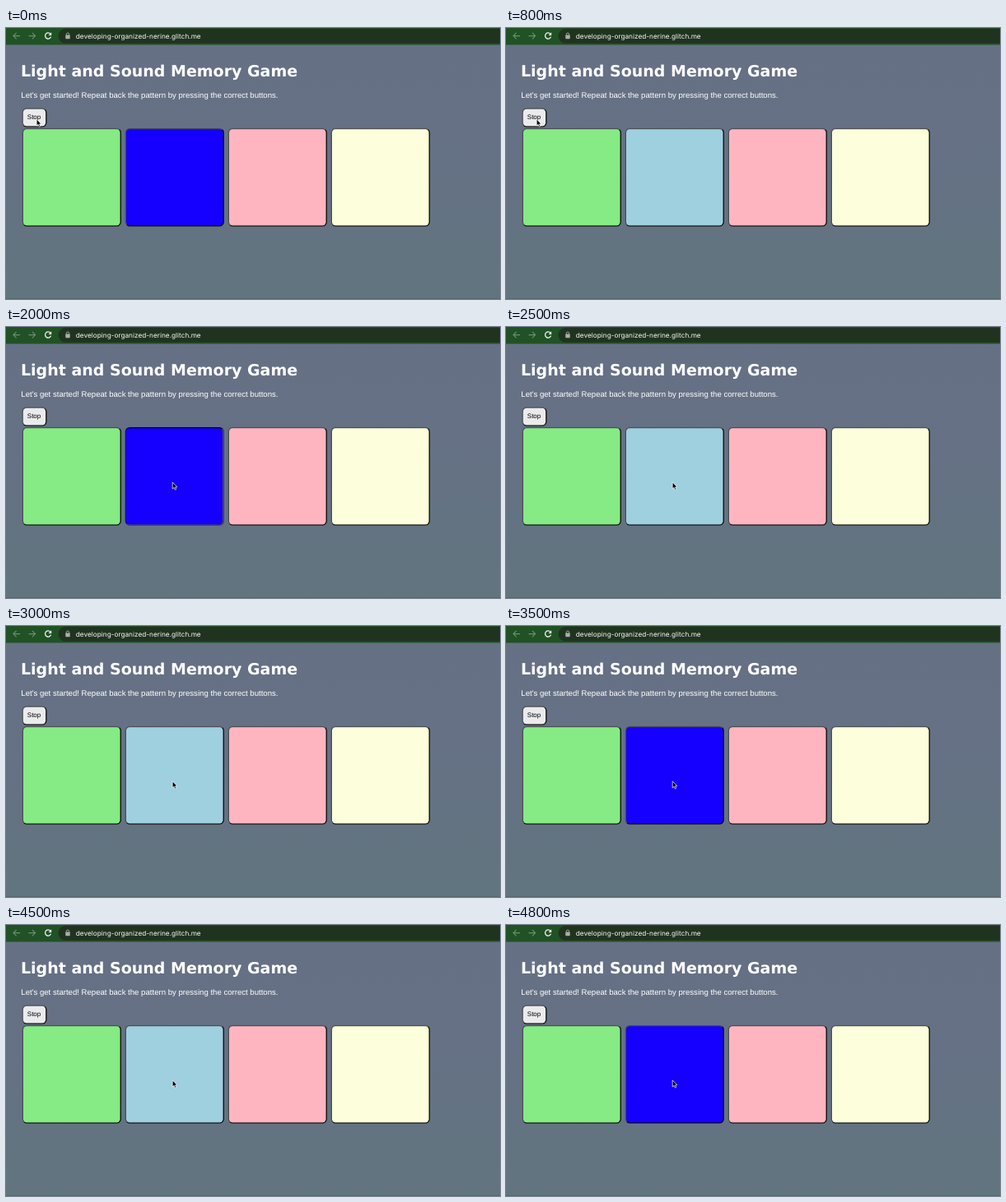
These frames come from a looping animation (600 px wide and 330 px high, 5000 ms). An HTML page:

```html
<!DOCTYPE html>
<html lang="en">
<head>
<meta charset="utf-8">
<title>Light and Sound Memory Game</title>
<style>
  html, body { margin: 0; width: 100%; height: 100%; overflow: hidden; background: #667084; }
  svg { display: block; width: 600px; height: 330px; }
  text { text-rendering: geometricPrecision; }
  .ui { font-family: "Liberation Sans", Arial, sans-serif; }
</style>
</head>
<body>
<svg viewBox="0 0 600 330" xmlns="http://www.w3.org/2000/svg">
  <defs>
    <linearGradient id="page" x1="0" y1="0" x2="0" y2="1">
      <stop offset="0" stop-color="#667085"/>
      <stop offset=".5" stop-color="#657184"/>
      <stop offset="1" stop-color="#61757f"/>
    </linearGradient>
  </defs>
  <rect width="600" height="330" fill="url(#page)"/>
  <rect y="329" width="600" height="1" fill="#56666f"/>

  <!-- browser bar -->
  <rect width="600" height="20.5" fill="#205226"/>
  <path d="M600 .8H72.5a9 9 0 0 0 0 18H600z" fill="#20331f"/>
  <g fill="none" stroke-width="1.1">
    <path d="M17 9.6H9M12.6 5.9L8.9 9.6l3.7 3.7" stroke="#6d8f70"/>
    <path d="M27.5 9.6h8M31.9 5.9l3.7 3.7-3.7 3.7" stroke="#6d8f70"/>
    <path d="M54 7.2A3.6 3.6 0 1 0 54.6 10.6" stroke="#f2f5f2" stroke-width="1.3"/>
    <path d="M73.3 9V7.7a1.7 1.7 0 0 1 3.4 0V9" stroke="#a9b0a9" stroke-width=".9"/>
  </g>
  <path d="M55.2 5.3v3.6h-3.6z" fill="#f2f5f2"/>
  <rect x="72.3" y="8.6" width="5.4" height="4.6" rx=".6" fill="#a9b0a9"/>
  <text x="84.8" y="12.8" font-size="8.25" fill="#f4f6f4" font-family="Inter, sans-serif">developing-organized-nerine.glitch.me</text>

  <!-- page -->
  <text x="18" y="59.2" font-size="19" font-weight="700" fill="#fff" font-family="'DejaVu Sans', Verdana, sans-serif">Light and Sound Memory Game</text>
  <text class="ui" x="18.3" y="85.2" font-size="9.6" fill="#fff">Let's get started! Repeat back the pattern by pressing the correct buttons.</text>
  <g id="buttons"></g>
  <text class="ui" x="25.8" y="111.3" font-size="8" fill="#000">Stop</text>
  <path id="cursor" d="M0 0V8.1L1.9 6.4 3.1 9.2 4.5 8.6 3.3 5.9H5.7z" fill="#000" stroke="#fff" stroke-width=".7" stroke-linejoin="round"/>
</svg>
<script>
const LOOP = 5000, TICK = 100;
const DIM = '#9fd0e0', LIT = '#1500ff';
const SHADE = '#4a4c50', DARK = '#050505';
const START = [37.2, 111], END = [202.2, 189];
const board = document.getElementById('buttons');
const cursor = document.getElementById('cursor');

function add(parent, tag, attrs) {
  const el = document.createElementNS('http://www.w3.org/2000/svg', tag);
  for (const k in attrs) el.setAttribute(k, attrs[k]);
  parent.appendChild(el);
  return el;
}

// Rounded button with a bevelled edge: one tone top left, another bottom right.
function button(x, y, w, h, fill) {
  const g = add(board, 'g', { transform: `translate(${x} ${y})` });
  const r = 5.4, b = 1.2, c = r * 0.3;
  const high = add(g, 'rect', { width: w, height: h, rx: r, fill: SHADE });
  const low = add(g, 'path', {
    d: `M${w - c} ${c}A${r} ${r} 0 0 1 ${w} ${r}V${h - r}A${r} ${r} 0 0 1 ${w - r} ${h}H${r}` +
       `A${r} ${r} 0 0 1 ${c} ${h - c}L${r} ${h - r}H${w - r}V${r}z`,
    fill: DARK
  });
  const face = add(g, 'rect', { x: b, y: b, width: w - 2 * b, height: h - 2 * b, rx: r - b, fill });
  return { high, low, face };
}

button(19.6, 97.6, 29.8, 23, '#ebebed');
const pads = ['#86eb84', DIM, '#ffb5bf', '#fdfedb']
  .map((fill, i) => button(19.8 + 125 * i, 122, 120, 119.6, fill));
const pad = pads[1];

const within = (t, a, b) => t >= a && t < b;
const smooth = p => p * p * (3 - 2 * p);

function draw(t) {
  const pressed = within(t, 1800, 2500);
  const lit = pressed || t < 800 || within(t, 3500, 4500) || t >= 4800;
  pad.face.setAttribute('fill', lit ? LIT : DIM);
  pad.face.setAttribute('x', pressed ? 0.6 : 1.2);
  pad.high.setAttribute('fill', pressed ? DARK : SHADE);
  pad.low.setAttribute('fill', pressed ? SHADE : DARK);

  const step = Math.floor(t / TICK) * TICK;
  const p = smooth(Math.min(1, Math.max(0, (step - 1200) / 400)));
  const [x, y] = START.map((s, i) => s + (END[i] - s) * p);
  cursor.setAttribute('transform', `translate(${x} ${y})`);
}

const begin = performance.now();
function tick() {
  draw((performance.now() - begin) % LOOP);
  requestAnimationFrame(tick);
}
tick();
</script>
</body>
</html>
```
